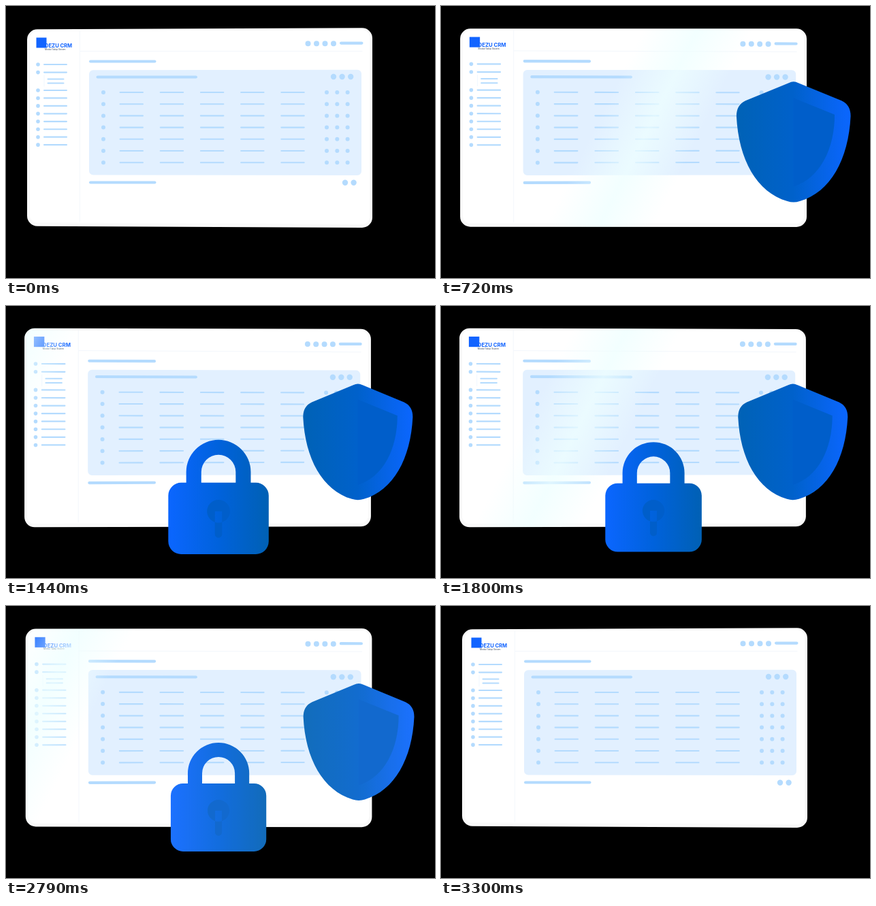
An HTML page with a canvas that plays this animation: 630x400 px, repeating every 3450 ms.

```html
<!DOCTYPE html>
<html lang="en">
<head>
<meta charset="utf-8">
<title>CRM security</title>
<style>
  html, body { margin: 0; width: 100%; height: 100%; overflow: hidden; background: #000; }
  canvas { display: block; }
</style>
</head>
<body>
<canvas id="stage" width="630" height="400"></canvas>
<script>
const ctx = document.getElementById('stage').getContext('2d');
const LOOP = 3450, ACTIVE = 3300, STEP = 30;
const ACCENT = '#b4dbfe';
const CENTER = { x: 284.5, y: 179 }, DEPTH = 2400;
const REST = 5 * Math.PI / 180, SWING = 6.5 * Math.PI / 180;
let angle = REST;

// Coordinates are given as seen at the resting tilt, then re-projected for the current one.
function project(x, y) {
  const w = x - CENTER.x;
  const u = w / (Math.cos(REST) + w * Math.sin(REST) / DEPTH);
  const zoom = (1 - u * Math.sin(REST) / DEPTH) / (1 - u * Math.sin(angle) / DEPTH);
  return {
    x: CENTER.x + u * Math.cos(angle) / (1 - u * Math.sin(angle) / DEPTH),
    y: CENTER.y + (y - CENTER.y) * zoom,
    zoom
  };
}

// Moves the origin to a projected point, with the local stretch of the tilt.
function enter(x, y, scale = 1) {
  const p = project(x, y);
  const stretch = project(x + 0.5, y).x - project(x - 0.5, y).x;
  ctx.setTransform(stretch * scale, 0, 0, p.zoom * scale, p.x, p.y);
}

const leave = () => ctx.setTransform(1, 0, 0, 1, 0, 0);

function dot(x, y, r) {
  const p = project(x, y);
  ctx.fillStyle = ACCENT;
  ctx.beginPath();
  ctx.arc(p.x, p.y, r, 0, 7);
  ctx.fill();
}

function line(x1, y1, x2, y2, width, color = ACCENT) {
  const a = project(x1, y1), b = project(x2, y2);
  ctx.strokeStyle = color;
  ctx.lineWidth = width;
  ctx.lineCap = 'round';
  ctx.beginPath();
  ctx.moveTo(a.x, a.y);
  ctx.lineTo(b.x, b.y);
  ctx.stroke();
}

// Horizontal bar whose round ends stay inside x1..x2.
const bar = (x1, x2, y, width) => line(x1 + width / 2, y, x2 - width / 2, y, width);

function roundedQuad(corners, radius, color) {
  const pts = corners.map(([x, y]) => project(x, y));
  ctx.beginPath();
  ctx.moveTo((pts[0].x + pts[1].x) / 2, (pts[0].y + pts[1].y) / 2);
  for (let i = 1; i <= 4; i++) {
    const a = pts[i % 4], b = pts[(i + 1) % 4];
    ctx.arcTo(a.x, a.y, b.x, b.y, radius);
  }
  ctx.closePath();
  ctx.fillStyle = color;
  ctx.fill();
}

function horizontalGradient(half, ...colors) {
  const g = ctx.createLinearGradient(-half, 0, half, 0);
  colors.forEach((c, i) => g.addColorStop(i / (colors.length - 1), c));
  return g;
}

// Slanted light band centred on x + y / 2 = position.
function shine(position, alpha, rgb) {
  const end = c => [c / 1.25, c / 2.5];
  const g = ctx.createLinearGradient(...end(position - 80), ...end(position + 80));
  g.addColorStop(0, `rgba(${rgb},0)`);
  g.addColorStop(0.5, `rgba(${rgb},${alpha})`);
  g.addColorStop(1, `rgba(${rgb},0)`);
  return g;
}

function drawLogo() {
  enter(44, 46);
  ctx.fillStyle = '#1264ff';
  ctx.fillRect(0.5, 0.5, 15, 15);
  ctx.font = 'bold 7.6px Inter, sans-serif';
  ctx.fillText('DEZU CRM', 13, 15.3);
  ctx.fillStyle = '#3a4658';
  ctx.font = '3.3px Inter, sans-serif';
  ctx.fillText('Modül Takip Sistem', 13, 19);
  leave();
}

function drawSidebar() {
  line(108.3, 37, 108.3, 317, 1, '#f3f7fc');
  line(56, 102, 56, 118, 0.7, '#eaf4ff');
  for (let i = 0; i < 10; i++) {
    const y = i < 2 ? 86 + i * 11.6 : 124 + (i - 2) * 11.45;
    dot(47, y, 2.8);
    bar(55, 90, y, 2.2);
  }
  bar(60.5, 85.5, 107.5, 2);
  bar(60.5, 85.5, 113.6, 2);
}

function drawContent() {
  line(109, 66.5, 523, 66.5, 1, '#f3f7fc');
  for (let i = 0; i < 4; i++) dot(443.5 + i * 12.5, 55.2, 4);
  bar(490, 524.5, 54.6, 4.2);
  bar(122, 220.5, 81.5, 4.2);

  roundedQuad([[122, 94.3], [522, 93.7], [522, 249], [122, 248.6]], 6, '#e2f0ff');
  bar(132.5, 281, 104.5, 4.2);
  for (let i = 0; i < 3; i++) dot(481 + i * 12.6, 104, 4.2);
  for (let row = 0; row < 7; row++) {
    const y = 127 + row * 17.2;
    dot(143, y, 3);
    for (let col = 0; col < 5; col++) bar(166.5 + col * 59.2, 202 + col * 59.2, y, 2.1);
    for (let col = 0; col < 3; col++) dot(471 + col * 15.3, y, 3);
  }

  bar(122, 220.5, 259.5, 4.2);
  dot(498, 259.7, 4.2);
  dot(510.6, 259.7, 4.2);
}

function drawPanel(position) {
  roundedQuad([[31, 34.4], [538, 32.2], [538, 326], [31, 323.6]], 15, '#fafafa');
  roundedQuad([[35, 37], [534, 35], [534, 320.5], [35, 318.5]], 11, '#fff');
  drawSidebar();
  drawContent();
  drawLogo();
  ctx.globalCompositeOperation = 'source-atop';
  ctx.fillStyle = shine(position, 0.75, '238,255,255');
  ctx.fillRect(0, 0, 630, 400);
  ctx.globalCompositeOperation = 'source-over';
}

function shieldPath() {
  const p = new Path2D();
  p.moveTo(-7, -84.5);
  p.quadraticCurveTo(0, -88, 7, -84.5);
  p.lineTo(69, -59);
  p.quadraticCurveTo(82, -53, 82, -37);
  p.bezierCurveTo(79, 25, 53, 72, 9, 85);
  p.quadraticCurveTo(0, 88, -9, 85);
  p.bezierCurveTo(-53, 72, -79, 25, -82, -37);
  p.quadraticCurveTo(-82, -53, -69, -59);
  p.closePath();
  return p;
}

function lockPath() {
  const p = new Path2D();
  p.roundRect(-70, -20, 140, 100, 18);
  p.moveTo(-45, -19);
  p.lineTo(-45, -35);
  p.arc(0, -35, 45, Math.PI, 0);
  p.lineTo(45, -19);
  p.lineTo(24, -19);
  p.lineTo(24, -35);
  p.arc(0, -35, 24, 0, Math.PI, true);
  p.lineTo(-24, -19);
  p.closePath();
  return p;
}

const facet = new Path2D('M0-63 L59-39 C59 10 38 52 0 64 Z');
const keyhole = new Path2D('M-5 20 V52 A5 5 0 0 0 5 52 V20 Z M16 20 A16 16 0 1 1 -16 20 A16 16 0 1 1 16 20 Z');
const shield = { x: 518.5, y: 200, outline: shieldPath(), detail: facet, half: 82, colors: ['#0062b6', '#0061cb', '#0b66ff'] };
const lock = { x: 312, y: 281, outline: lockPath(), detail: keyhole, half: 70, colors: ['#0b66ff', '#0062dc', '#0060b4'] };

function drawBadge(badge, scale, position, lift) {
  if (scale <= 0) return;
  enter(badge.x, badge.y, scale);
  ctx.fillStyle = horizontalGradient(badge.half, ...badge.colors);
  ctx.fill(badge.outline);
  ctx.fillStyle = '#005eca';
  ctx.fill(badge.detail);
  if (lift > 0.005) {
    ctx.fillStyle = `rgba(255,255,255,${lift})`;
    ctx.fill(badge.outline);
  }
  ctx.save();
  ctx.clip(badge.outline);
  leave();
  ctx.fillStyle = shine(position, 0.17, '170,235,255');
  ctx.fillRect(0, 0, 630, 400);
  ctx.restore();
  leave();
}

// Fast rise past full size, then a slow settle.
function pop(elapsed) {
  const rise = 235, settle = 800, over = 0.065;
  if (elapsed <= 0) return 0;
  if (elapsed < rise) return (1 + over) * Math.sin(Math.PI / 2 * elapsed / rise);
  const s = Math.min(1, (elapsed - rise) / settle);
  return 1 + over * (1 + Math.cos(Math.PI * s)) / 2;
}

function draw(time) {
  let t = Math.floor(time % LOOP / STEP) * STEP;
  if (t >= ACTIVE) t = 0;
  angle = REST - SWING * Math.sin(Math.PI * t / ACTIVE);
  const position = -95 + 0.68 * (t % 1233);
  const lift = 0.07 * Math.exp(-(((t - 2790) / 200) ** 2));

  ctx.clearRect(0, 0, 630, 400);
  drawPanel(position);
  drawBadge(shield, pop(t - 90), position, lift);
  drawBadge(lock, pop(t - 973), position, lift);
}

const start = performance.now();
function tick() {
  draw(performance.now() - start);
  requestAnimationFrame(tick);
}
tick();
</script>
</body>
</html>
```
